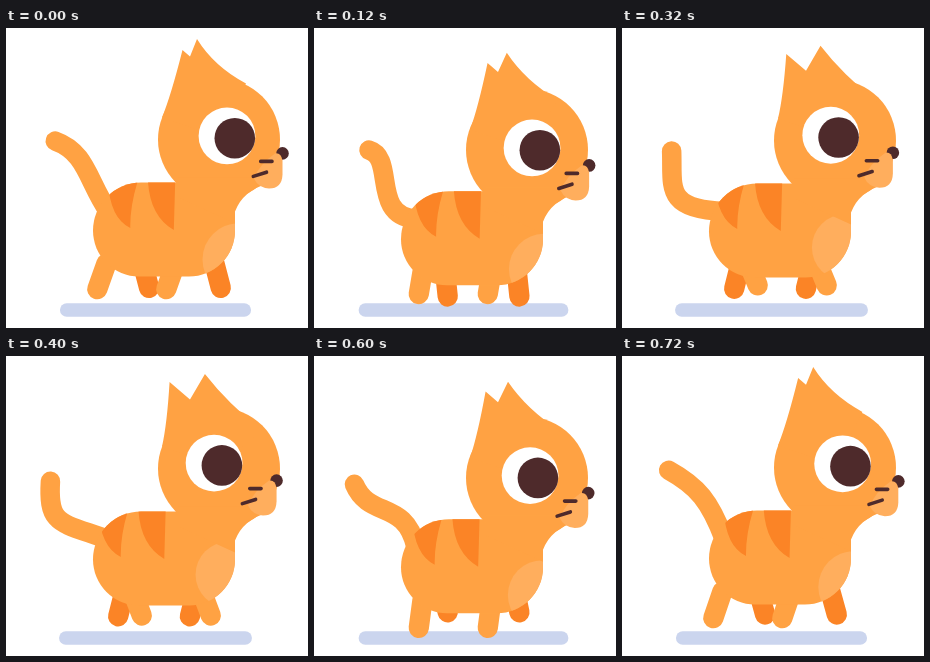
Recreate the animation shown at these times as an HTML page with a canvas. Size 302 by 300 pixels, loop 760 ms.

```html
<!DOCTYPE html>
<html>
<head>
<meta charset="utf-8">
<title>Walking cat</title>
<style>
html, body { margin: 0; width: 302px; height: 300px; overflow: hidden; background: #fff; }
canvas { display: block; }
</style>
</head>
<body>
<canvas id="stage" width="302" height="300"></canvas>
<script>
const ctx = document.getElementById('stage').getContext('2d');
const LOOP = 760, STEP = 40, RAD = Math.PI / 180;
const FUR = '#ffa243', DARK = '#fb8426', LIGHT = '#ffae5d', BROWN = '#4e2a2b', GROUND = '#cbd5ee';

function fill(path, color) {
  ctx.fillStyle = color;
  ctx.fill(new Path2D(path));
}

function stroke(path, width, color) {
  ctx.lineWidth = width;
  ctx.strokeStyle = color;
  ctx.stroke(new Path2D(path));
}

function disc(x, y, r, color) {
  ctx.fillStyle = color;
  ctx.beginPath();
  ctx.arc(x, y, r, 0, 2 * Math.PI);
  ctx.fill();
}

// Runs draw with the origin moved by (x, y).
function shifted(x, y, draw) {
  ctx.save();
  ctx.translate(x, y);
  draw();
  ctx.restore();
}

function leg(x, swing, footY, color) {
  stroke(`M${x + swing * 0.6} 236L${x + swing} ${footY}`, 20.3, color);
}

function tail(angle) {
  const wave = (mid, amp, peak) => mid + amp * Math.cos(angle - peak * RAD);
  const bend = [wave(66, 27, 306), wave(162, 27, 107), wave(62, 22, 32), wave(146, -26, 35)];
  stroke(`M102 183C${bend} ${wave(47.5, 8, 77)} ${wave(119, -6, 25)}`, 19.5, FUR);
}

function torso(turn, drop) {
  const body = new Path2D('M87 203A48 48 0 0 1 135 155H229V203A46 46 0 0 1 183 249H133A46 46 0 0 1 87 203Z');
  ctx.save();
  ctx.fillStyle = FUR;
  ctx.fill(body);
  ctx.clip(body);
  shifted(4.8 * turn, 0, () => {
    fill('M97 150Q98 190 119.5 200.5Q119 178 128 150Z', DARK);
    fill('M137 150Q138 188 163 202.5L164.5 150Z', DARK);
  });
  disc(227.5 + 5 * turn, 225 + 7 * turn + drop / 2, 34.5 + 1.5 * turn, LIGHT);
  ctx.restore();
}

function skull() {
  disc(213, 112, 61, FUR);
  fill('M172 150H262V156Q237 163 229 184V196L172 170Z', FUR);
}

function ears(turn) {
  fill(`M156 90Q${163 + 2 * turn} 68 ${170 + 6.5 * turn} ${24 - 1.5 * turn}
    L184 ${36 - 7 * turn}L${195 - 4 * turn} ${14.5 - 3 * turn}
    Q${215 - 7 * turn} ${43 - 4 * turn} ${248 - 8 * turn} ${65 - 9 * turn}L213 110Z`, FUR);
}

function face(turn) {
  shifted(3 * turn, turn, () => {
    disc(273.5, 125, 6.3, BROWN);
    fill('M266 125Q272 124 273.5 132V146Q273 160 260 160Q249 159 245 150Q250 136 266 125Z', LIGHT);
  });
  shifted(6.5 * turn, turn, () => {
    disc(214.5, 107.5, 28.4, '#fff');
    disc(222.3, 109.8, 20.3, BROWN);
  });
  shifted(5.5 * turn, turn, () => stroke('M249.2 133H260.5M241.8 148L255 143.8', 3.6, BROWN));
}

function draw(time) {
  const t = Math.floor(time % LOOP / STEP) * STEP;
  const angle = 2 * Math.PI * t / LOOP;
  const turn = Math.cos(angle);
  const dip = Math.sin(angle + 20 * Math.PI / 380) ** 2;
  const drop = 10.6 * dip - 0.7;
  const swing = Math.cos(angle + 0.165);
  const farY = 260.3 - 13 * Math.max(0, -Math.sin(angle)) ** 2;
  const nearY = 260 + 1.5 * turn - 3.5 * Math.sin(angle);
  const half = 88.5 + 11.5 * dip;

  ctx.clearRect(0, 0, 302, 300);
  ctx.lineCap = 'round';
  stroke(`M${149.5 - half} 282H${149.5 + half}`, 13.5, GROUND);
  shifted(0, drop, () => {
    leg(127.3, 16 * swing, farY, DARK);
    leg(199, 16 * swing, farY, DARK);
    tail(angle);
    leg(114, -23 * swing, nearY, FUR);
    leg(183, -23 * swing, nearY, FUR);
    torso(turn, drop);
  });
  shifted(0, 1.2 * drop, skull);
  shifted(0, 1.45 * drop, () => {
    ears(turn);
    face(turn);
  });
}

function tick() {
  draw(performance.now());
  requestAnimationFrame(tick);
}
tick();
</script>
</body>
</html>
```
